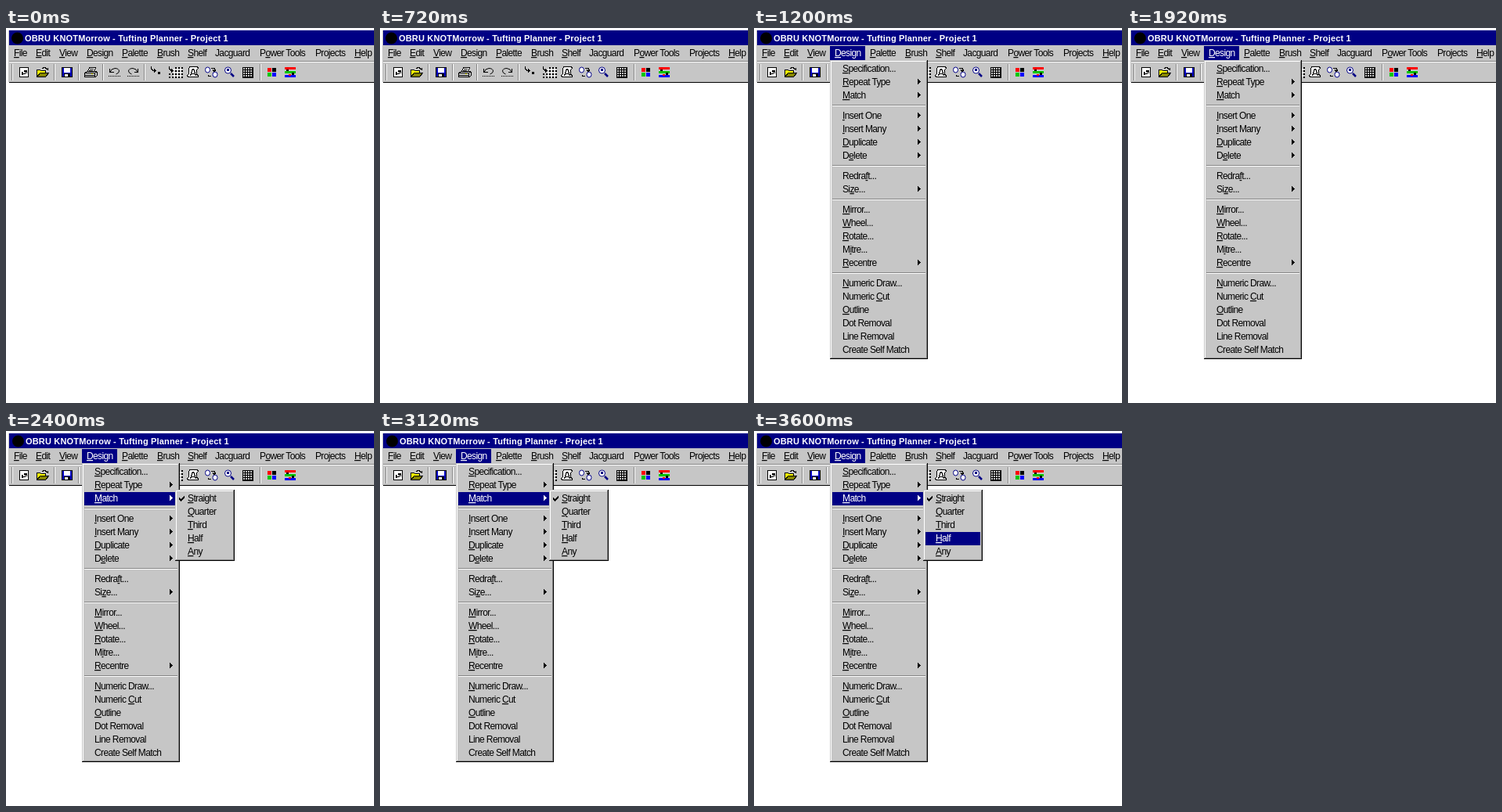
An HTML page that plays this animation: 470 by 479 pixels, repeating every 4.8 s.

```html
<!DOCTYPE html>
<html lang="en">
<head>
<meta charset="utf-8">
<title>Design menu</title>
<style>
  html, body { margin: 0; width: 100%; height: 100%; overflow: hidden; background: #fff; }
  svg { display: block; font: 12px "Liberation Sans", Arial, sans-serif; letter-spacing: -.63px; }
  text { white-space: pre; }
  .key { text-decoration: underline; }
  #title { font-weight: bold; font-size: 11px; letter-spacing: .17px; }
  path, rect { shape-rendering: crispEdges; }
  .soft path { shape-rendering: auto; }
</style>
</head>
<body>
<svg id="stage" width="470" height="479" viewBox="0 0 470 479"></svg>
<script>
const FACE = '#c6c6c6', NAVY = '#000084', SHADE = '#848484', STEP = 1200;

const rect = (x, y, w, h, fill) => `<rect x="${x}" y="${y}" width="${w}" height="${h}" fill="${fill}"/>`;
const path = (d, fill = 'none', stroke = '#000') => `<path d="${d}" fill="${fill}" stroke="${stroke}"/>`;
const group = (id, body) => `<g id="${id}">${body}</g>`;
const soft = body => `<g class="soft">${body}</g>`;

// "_" marks the underlined shortcut letter
const label = (x, y, s, fill = '#000') =>
  `<text x="${x}" y="${y}" fill="${fill}">${s.replace(/_(.)/, '<tspan class="key">$1</tspan>')}</text>`;

const etchV = x => rect(x, 46, 1, 21, SHADE) + rect(x + 1, 46, 1, 21, '#fff');
const etchH = (x, y, w) => rect(x, y, w, 1, SHADE) + rect(x, y + 1, w, 1, '#fff');
const arrow = (y, fill) => path(`M209 ${y - 8}v7l4-3.5z`, fill, 'none');

const panel = (x, y, w, h) =>
  rect(x, y, w, h, '#000') + rect(x, y, w - 1, h - 1, FACE) +
  rect(x + 1, y + 1, w - 2, h - 2, SHADE) + rect(x + 1, y + 1, w - 3, h - 3, '#fff') +
  rect(x + 2, y + 2, w - 4, h - 4, FACE);

const menuBar = [[10, '_File'], [38, '_Edit'], [68, '_View'], [103, '_Design'], [148, '_Palette'],
  [193, '_Brush'], [232, '_Shelf'], [267, 'Jacguard'], [324, 'P_ower Tools'], [395, 'Projects'], [445, '_Help']];

// ">" opens a submenu, "-" is a divider
const designItems = ['_Specification...', '_Repeat Type>', '_Match>', '-', '_Insert One>', '_Insert Many>',
  '_Duplicate>', 'D_elete>', '-', 'Redra_ft...', 'Si_ze...>', '-', '_Mirror...', '_Wheel...', '_Rotate...',
  'M_itre...', '_Recentre>', '-', '_Numeric Draw...', 'Numeric _Cut', '_Outline', 'Dot Removal',
  'Line Removal', 'Create Self Match'];
const matchItems = ['_Straight', '_Quarter', '_Third', '_Half', '_Any'];

function dots(x, y, cols, rows, gap, size, fill = '#000') {
  let out = '';
  for (let i = 0; i < cols * rows; i++)
    out += rect(x + i % cols * gap, y + Math.floor(i / cols) * gap, size, size, fill);
  return out;
}

const icons = [
  // new, open, save
  path('M17.5 50.5h11v12h-11z', '#fff') + path('M20 60v-4h2v2h2v-2h-1v-2h4v4h-1v-2h-1v3h-3v1z', '#000', 'none'),
  path('M39.5 62.5v-9h4l1 1h6v3', '#ffff00') + path('M39.5 62.5l4-5h11l-4 5z', '#848400') +
    path('M46 51.5h1v-1h3v1h1v1h2m0 1v-3'),
  path('M71.5 50.5h13v12h-13z', '#0000c6') + rect(74, 51, 8, 6, '#fff') + rect(74, 58, 8, 4, '#000') +
    rect(75, 59, 4, 3, '#fff'),
  // print
  path('M104.5 55.5l2-5h8l-2 5', '#fff') + path('M107 52.5h5m-6 2h5') +
    path('M100.5 57.5l3-2h11l2 1v4l-2 2h-14z', FACE) + path('M100 57.5h13.5v5m0-5l3-2m-16 4.5h13') +
    rect(109, 58, 2, 1, '#ffff00') + path('M102.5 62.5h10', 'none', '#000'),
  // undo, redo
  soft(path('M133 56.5q1-4.5 6-5q5 0 5.5 3.5q0 2.5-4 4')) + path('M132.5 52v4.5h5') + dots(131, 61, 8, 1, 2, 1),
  soft(path('M168 56.5q-1-4.5-6-5q-5 0-5.5 3.5q0 2.5 4 4')) + path('M168.5 52v4.5h-5') + dots(155, 61, 8, 1, 2, 1),
  // place one, place many
  path('M185.5 49v3l2 2h3') + path('M189 51l3 3.5-3 3z', '#000', 'none') + rect(194, 56, 3, 3, '#000'),
  path('M208.5 49v3l2 2h2') + path('M211 51l3 3.5-3 3z', '#000', 'none') +
    dots(216, 50, 3, 4, 4, 2) + dots(208, 58, 2, 2, 4, 2) + dots(214, 52, 3, 3, 4, 2, '#fff'),
  // scroll
  path('M234.5 49.5h10l1 2-2 2v6l2 1v2h-13l-1-2 2-2v-6z', '#fff') +
    path('M235.5 61l3-9h1l3 9m-6-3h5'),
  // swap
  soft(path('M254.5 53.5a3 3.5 0 1 0 6 0a3 3.5 0 1 0-6 0M264 59.5a3 3.5 0 1 0 6 0a3 3.5 0 1 0-6 0', '#fff', NAVY)) +
    path('M262 51.5h4v4m-2-2l2 2 2-2m-10 6v2h4'),
  // zoom
  soft(path('M279.5 54a4 4 0 1 0 8 0a4 4 0 1 0-8 0', '#fff', NAVY) +
    `<path d="M287 58l4 4" stroke="${NAVY}" stroke-width="2.5"/>`) + rect(282, 52, 3, 3, NAVY),
  // grid
  rect(302, 50, 14, 14, '#000') + dots(303, 51, 4, 4, 3, 2, FACE),
  // colours
  rect(334, 51, 5, 5, '#ff0000') + rect(340, 51, 5, 5, '#000') +
    rect(334, 57, 5, 5, '#00c600') + rect(340, 57, 5, 5, '#0000ff'),
  // bars
  rect(356, 50, 14, 3, '#ff0000') + rect(358, 53, 3, 2, '#000') + rect(356, 55, 14, 3, '#00c600') +
    rect(365, 57, 3, 3, '#000') + rect(356, 60, 14, 3, '#0000ff') + rect(361, 59, 3, 2, '#ff0000')
].join('');

function designMenu() {
  let y = 56, out = rect(97, 23, 45, 18, NAVY) + label(103, 36, '_Design', '#fff') + panel(97, 41, 125, 382);
  for (const item of designItems) {
    if (item === '-') {
      out += etchH(100, y - 9, 119);
      y += 9;
      continue;
    }
    out += label(113, y, item.replace('>', ''));
    if (item.endsWith('>')) out += arrow(y, '#000');
    y += 17;
  }
  return out;
}

const matchMenu = rect(100, 78, 119, 17, NAVY) + label(113, 90, '_Match', '#fff') + arrow(90, '#fff') +
  panel(216, 75, 76, 91) + matchItems.map((s, i) => label(232, 90 + 17 * i, s)).join('') +
  path('M221 85v3l2 2 5-5v-3l-5 5z', '#000', 'none');

const stage = document.getElementById('stage');
stage.innerHTML =
  rect(3, 3, 467, 66, FACE) + rect(4, 3, 466, 19, NAVY) + rect(4, 69, 466, 1, '#000') +
  group('caption', '<circle cx="14.5" cy="13" r="7.5" fill="#000"/>' +
    '<text id="title" x="24" y="17" fill="#fff">OBRU KNOTMorrow - Tufting Planner - Project 1</text>') +
  menuBar.map(([x, s]) => label(x, 36, s)).join('') +
  etchH(4, 42, 466) + [7, 61, 92, 123, 176, 324].map(etchV).join('') + icons +
  group('design', designMenu()) + group('match', matchMenu) +
  group('half', rect(219, 129, 70, 17, NAVY) + label(232, 141, '_Half', '#fff'));

const layers = ['design', 'match', 'half'].map(id => document.getElementById(id));
const caption = document.getElementById('caption');
const start = performance.now();

function draw() {
  const step = Math.floor(Math.max(0, performance.now() - start) / STEP) % 4;
  layers.forEach((layer, i) => layer.setAttribute('visibility', step > i ? 'visible' : 'hidden'));
  caption.setAttribute('transform', `translate(${step ? 1 : 0})`);
  requestAnimationFrame(draw);
}
draw();
</script>
</body>
</html>
```
